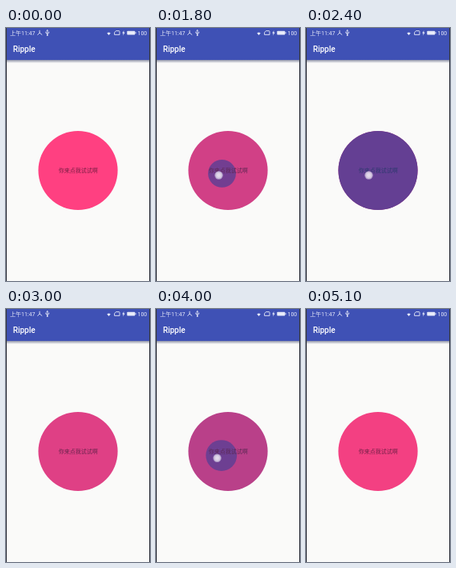
Recreate the animation shown at these times as an HTML page. Size 180 by 317 pixels, loop 5200 ms.

```html
<!DOCTYPE html>
<html lang="zh">
<head>
<meta charset="utf-8">
<title>Ripple</title>
<style>
  html, body { margin: 0; width: 100%; height: 100%; overflow: hidden; background: #fafaf9; }
  svg { display: block; width: 100vw; height: 100vh; }
  text { font-family: Roboto, "Noto Sans CJK SC", "Noto Sans CJK", sans-serif; font-size: 7px; }
</style>
</head>
<body>
<svg viewBox="0 0 180 317">
  <defs>
    <linearGradient id="shade" x2="0" y2="1">
      <stop stop-color="#8f94a8"/>
      <stop offset="1" stop-color="#fafaf9"/>
    </linearGradient>
    <clipPath id="disc"><circle cx="90" cy="178.5" r="49.6"/></clipPath>
  </defs>
  <rect width="180" height="317" fill="#fafaf9"/>
  <rect y="40" width="180" height="4" fill="url(#shade)"/>
  <rect width="180" height="40" fill="#3f51b5"/>
  <path d="M.5 0V317M179.5 0V317" stroke="#333640"/>

  <g fill="#e8ebfa">
    <text x="5" y="9">上午11:47</text>
    <text x="164.5" y="8.7">100</text>
    <text x="8.7" y="30" style="font-size:10px;font-weight:500" fill="#fff">Ripple</text>
    <path d="M126.3 6.4q2.2-1.6 4.4 0L128.5 9z"/>
    <path d="M147.5 3l-2.3 3.6h1.5l-.6 2.8 2.6-3.9h-1.6z"/>
    <rect x="151.3" y="3.7" width="10" height="4.8" rx=".8"/>
    <rect x="161.5" y="5.1" width="1" height="2"/>
    <circle cx="51.7" cy="9" r=".9"/>
  </g>
  <g fill="none" stroke="#e8ebfa" stroke-width=".9">
    <path d="M42 2.8v3.2l-2.6 2.8M42 6l3.2 2.6"/>
    <path d="M51.7 9V2.6M49.8 4.6v1.6l1.9 1.2 1.9-1.2V4.6M50.7 3.5l1-1.2 1 1.2"/>
    <path d="M135.6 8.4V5.6l1.9-2h3.7q.8 0 .8.8v4z"/>
  </g>

  <circle id="base" cx="90" cy="178.5" r="49.6"/>
  <circle id="ripple" fill="#643f93" clip-path="url(#disc)"/>
  <text id="label" x="90.3" y="181" text-anchor="middle">你来点我试试啊</text>
  <g id="touch">
    <circle r="5.2" fill="#aa94c4"/>
    <circle r="4.2" fill="#d3c6e0"/>
    <circle r="2.4" fill="#e2d9ea"/>
  </g>
</svg>
<script>
const LOOP = 5200, STEP = 100;
const PINK = [255, 64, 129], PURPLE = [100, 63, 147];
const INK = [120, 30, 68], DARK_INK = [45, 57, 110];
const presses = [
  { down: 1300, grow: 1480, full: 2400, up: 2700, fade: 2650, end: 3090, x: 78.5, y: 184.5, tint: .86 },
  { down: 3600, grow: 3620, full: 4600, up: 4800, fade: 4750, end: 5130, x: 76.5, y: 186.7, tint: 1.16 }
];
const [base, ripple, label, touch] =
  ['base', 'ripple', 'label', 'touch'].map(id => document.getElementById(id));

const lerp = (a, b, k) => a + (b - a) * k;
const progress = (t, a, b) => Math.min(1, Math.max(0, (t - a) / (b - a)));
const mix = (a, b, k) => `rgb(${a.map((v, i) => Math.round(lerp(v, b[i], k)))})`;

function draw(t) {
  const press = presses.find(p => t >= p.down && t < p.end);
  const held = press && t < press.up;
  let grown = 0, tint = 0, ink = 0;
  if (held) {
    grown = progress(t, press.grow, press.full);
    tint = Math.min(.5, grown * press.tint);
    ink = grown;
    // The ripple drifts from the finger to the middle of the disc while it grows.
    ripple.setAttribute('cx', lerp(press.x, 90, grown));
    ripple.setAttribute('cy', lerp(press.y, 178.5, grown));
    touch.setAttribute('transform', `translate(${press.x} ${press.y})`);
  } else if (press) {
    tint = ink = 1 - progress(t, press.fade, press.end);
  }
  ripple.setAttribute('r', grown * 50);
  ripple.setAttribute('opacity', Math.min(1, .8 + grown * .2));
  touch.setAttribute('visibility', held ? 'visible' : 'hidden');
  base.setAttribute('fill', mix(PINK, PURPLE, tint));
  label.setAttribute('fill', mix(INK, DARK_INK, ink));
}

const start = performance.now();
function tick() {
  const t = (performance.now() - start) % LOOP;
  draw(Math.floor(t / STEP) * STEP);
  requestAnimationFrame(tick);
}
tick();
</script>
</body>
</html>
```
